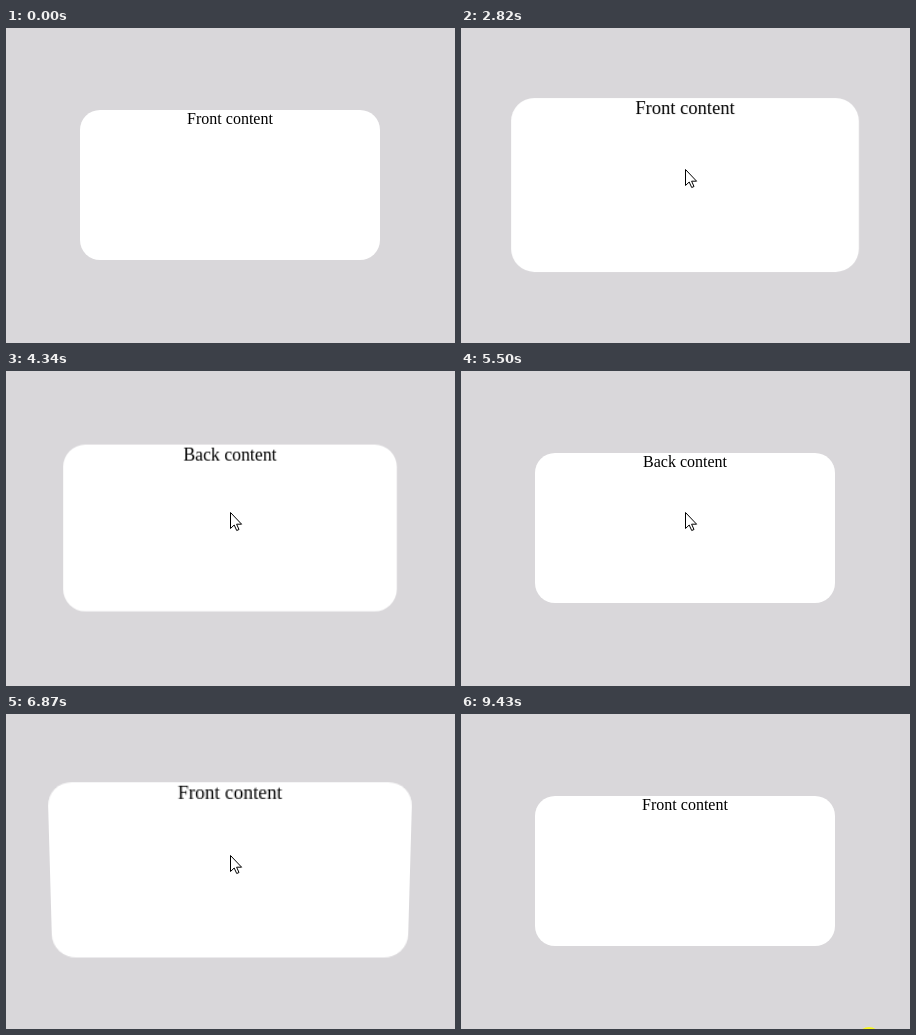
Write an HTML page that moves like this. It is 449 px wide and 315 px high and loops after 9530 ms.

```html
<!DOCTYPE html>
<html lang="en">
<head>
<meta charset="utf-8">
<title>Card flip</title>
<style>
  html, body { margin: 0; width: 100%; height: 100%; overflow: hidden; background: #d9d7da; }
  #card {
    position: absolute; left: 74px; top: 82px; width: 300px; height: 150px;
    border-radius: 20px; background: #fff; color: #000; text-align: center;
    font: 16px/18px "Liberation Serif", "Times New Roman", serif;
  }
  svg { position: absolute; left: 0; top: 0; }
</style>
</head>
<body>
<div id="card">Front content</div>
<svg width="449" height="315">
  <g id="pointer">
    <circle id="press" r="12" fill="#ff0" fill-opacity=".85"/>
    <path d="M.5 .5V16.5L4.2 13 6.7 18.5 9 17.5 6.6 12.2H11.6Z" fill="#fff" stroke="#000"/>
  </g>
</svg>
<script>
const LOOP = 9530;
const [card, pointer, press] = ['card', 'pointer', 'press'].map(id => document.getElementById(id));

const clamp = v => Math.min(1, Math.max(0, v));
const mix = (a, b, k) => a + (b - a) * k;

// The CSS "ease" curve: cubic-bezier(.25, .1, .25, 1)
function ease(x) {
  const curve = (s, a, b) => 3 * a * s * (1 - s) ** 2 + 3 * b * s * s * (1 - s) + s ** 3;
  let lo = 0, hi = 1;
  for (let i = 0; i < 24; i++) {
    const mid = (lo + hi) / 2;
    if (curve(mid, .25, .25) < x) lo = mid; else hi = mid;
  }
  return x <= 0 ? 0 : x >= 1 ? 1 : curve(lo, .1, 1);
}
const step = (t, start, length) => ease(clamp((t - start) / length));

const smooth = k => k * k * (3 - 2 * k);
const easeOut = k => 1 - (1 - k) ** 2;

// Pointer moves: start, end, target x, target y, easing
const moves = [
  [450, 1400, 227, 148, easeOut],
  [1430, 1530, 224, 141, smooth],
  [8750, 9180, 366, 317, smooth],
  [9180, 9430, 408, 325, easeOut],
];
const presses = [[1910, 2010], [5420, 5500], [9430, LOOP]];

function pointerAt(t) {
  let x = 338, y = 318;
  for (const [start, end, tx, ty, curve] of moves) {
    const k = curve(clamp((t - start) / (end - start)));
    x = mix(x, tx, k);
    y = mix(y, ty, k);
  }
  return [Math.round(x), Math.round(y)];
}

function draw(t) {
  const grow = step(t, 2505, 640) - step(t, 4180, 610)
             + step(t, 6030, 492) - step(t, 7520, 540);
  const turn = step(t, 3189, 560) - step(t, 6523, 520);
  const back = turn > .5;
  const angle = back ? 180 - 180 * turn : -180 * turn;
  const label = back ? 'Back content' : 'Front content';

  if (card.textContent !== label) card.textContent = label;
  card.style.transform = grow || angle
    ? `perspective(1500px) rotateX(${angle}deg) scale(${1 + .2 * grow})` : 'none';

  pointer.setAttribute('transform', `translate(${pointerAt(t)})`);
  const down = presses.some(([from, to]) => t >= from && t < to);
  press.setAttribute('visibility', down ? 'visible' : 'hidden');
}

const origin = performance.now();
function tick() {
  draw((performance.now() - origin) % LOOP);
  requestAnimationFrame(tick);
}
tick();
</script>
</body>
</html>
```
